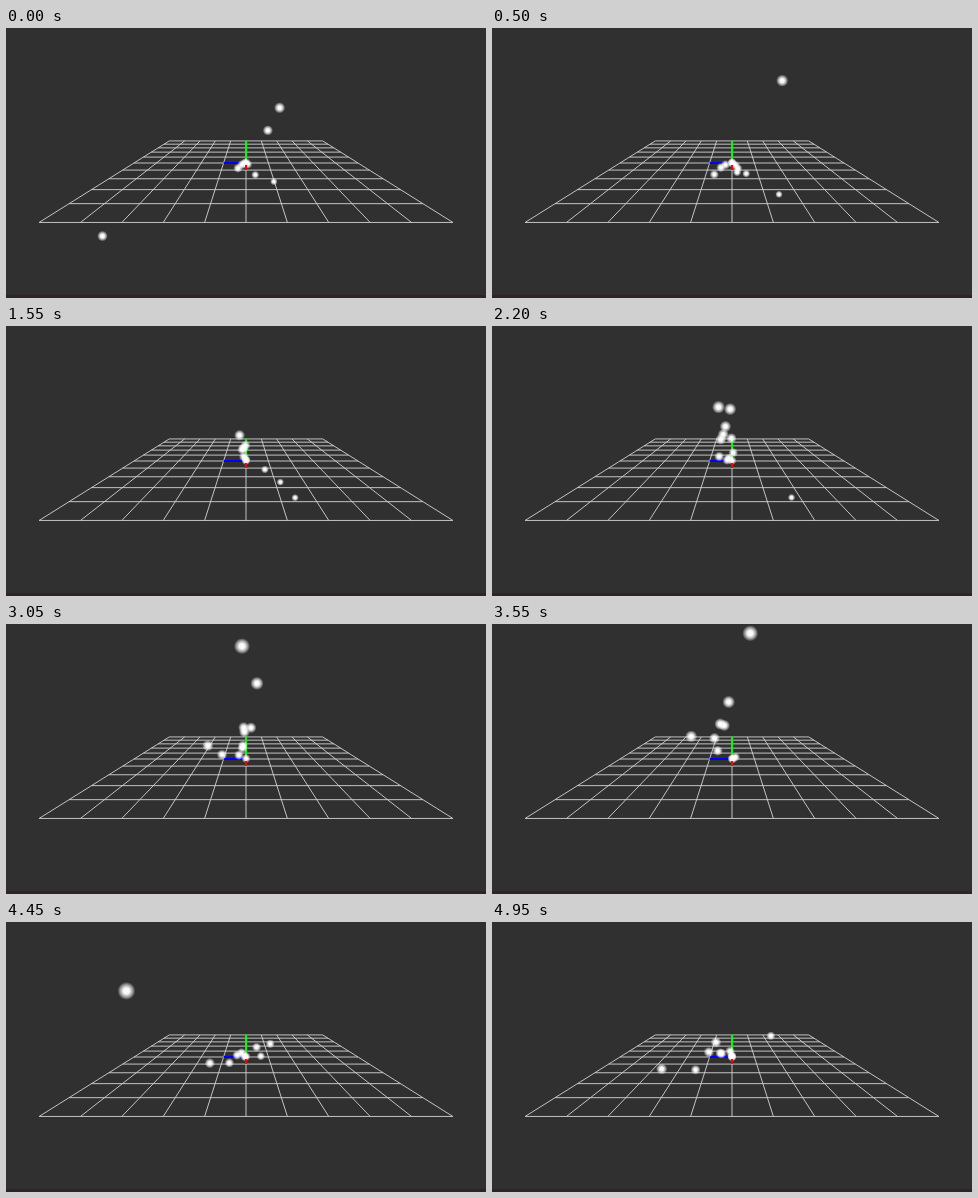
Recreate the animation shown at these times as an HTML page with a canvas. Size 480x270 px, loop 5 s.

```html
<!DOCTYPE html>
<html>
<head>
<meta charset="utf-8">
<style>
html, body { margin: 0; width: 100%; height: 100%; overflow: hidden; background: #303030; }
canvas { display: block; }
</style>
</head>
<body>
<canvas id="stage" width="480" height="270"></canvas>
<script>
const ctx = document.getElementById('stage').getContext('2d');
const LOOP = 5, STEP = 0.05, CX = 240, CY = 135;
const FIRST_BURST = -1.8, BURST_GAP = 0.43, LEAD_LIFE = 1.9;

// Velocity of the leading particle of each burst
const headings = [
  [-55, 28], [18.3, -30], [24, 16], [-14, 9], [21.4, 16], [22, 13.5],
  [-7, -28], [-1.5, -42], [-20, -7], [9, -62], [-2.5, -43], [-57, -31.5],
  [17.5, -9.5], [-47, 8], [-18.5, -17], [-6, -18]
];

let seed = 7;
function random() {
  seed = (seed * 16807) % 2147483647;
  return seed / 2147483647;
}

// Each burst is a far-flying leader and two short-lived, scattered followers
const particles = headings.flatMap(([vx, vy], burst) => [0, 1, 2].map(n => {
  const lead = n === 0;
  const angle = Math.atan2(vy, vx) + (lead ? 0 : random() - .5);
  const speed = Math.hypot(vx, vy) * (lead ? 1 : .4 + .6 * random());
  return {
    birth: FIRST_BURST + (burst + n / 3) * BURST_GAP,
    life: lead ? LEAD_LIFE : .6 + .8 * random(),
    vx: speed * Math.cos(angle),
    vy: speed * Math.sin(angle)
  };
}));

// Camera at height 3, distance 10, looking at the origin, 60 degree lens
function project(x, y, z) {
  const dist = Math.hypot(3, 10), sin = 3 / dist, cos = 10 / dist;
  const scale = 135 * Math.sqrt(3) / (dist - y * sin - z * cos);
  return [CX + x * scale, CY - (y * cos - z * sin) * scale];
}

function line(a, b, color, width) {
  ctx.strokeStyle = color;
  ctx.lineWidth = width;
  ctx.beginPath();
  ctx.moveTo(...project(...a));
  ctx.lineTo(...project(...b));
  ctx.stroke();
}

function glow(x, y, r) {
  const g = ctx.createRadialGradient(x, y, 0, x, y, r);
  g.addColorStop(0, '#fff');
  g.addColorStop(.35, 'rgba(255,255,255,.95)');
  g.addColorStop(.7, 'rgba(255,255,255,.5)');
  g.addColorStop(1, 'rgba(255,255,255,0)');
  ctx.fillStyle = g;
  ctx.fillRect(x - r, y - r, 2 * r, 2 * r);
}

function draw(t) {
  ctx.fillStyle = '#303030';
  ctx.fillRect(0, 0, 480, 270);
  ctx.fillStyle = '#2c2428';
  ctx.fillRect(0, 267, 480, 3);

  for (let i = -5; i <= 5; i++) {
    line([i, 0, -5], [i, 0, 5], '#d4d4d4', .9);
    line([-5, 0, i], [5, 0, i], '#d4d4d4', .9);
  }
  line([0, 0, 0], [-1, 0, 0], '#00f', 2);
  line([0, 0, 0], [0, 1, 0], '#0f0', 2);

  glow(CX, CY - .5, 4.5);
  for (const { birth, life, vx, vy } of particles) {
    const age = t - birth;
    if (age < 0 || age >= life) continue;
    const travel = age + .25 * age * age;
    const x = vx * travel, y = vy * travel;
    // Up and to the left is nearer to the camera
    glow(CX + x, CY + y, Math.max(3.7, 4.6 - .02 * x - .03 * y));
  }
  line([0, 0, .3], [0, 0, 1], '#f00', 2);
}

const start = performance.now();
function tick() {
  const t = (performance.now() - start) / 1000 % LOOP;
  draw(Math.floor(t / STEP + 1e-6) * STEP);
  requestAnimationFrame(tick);
}
tick();
</script>
</body>
</html>
```
